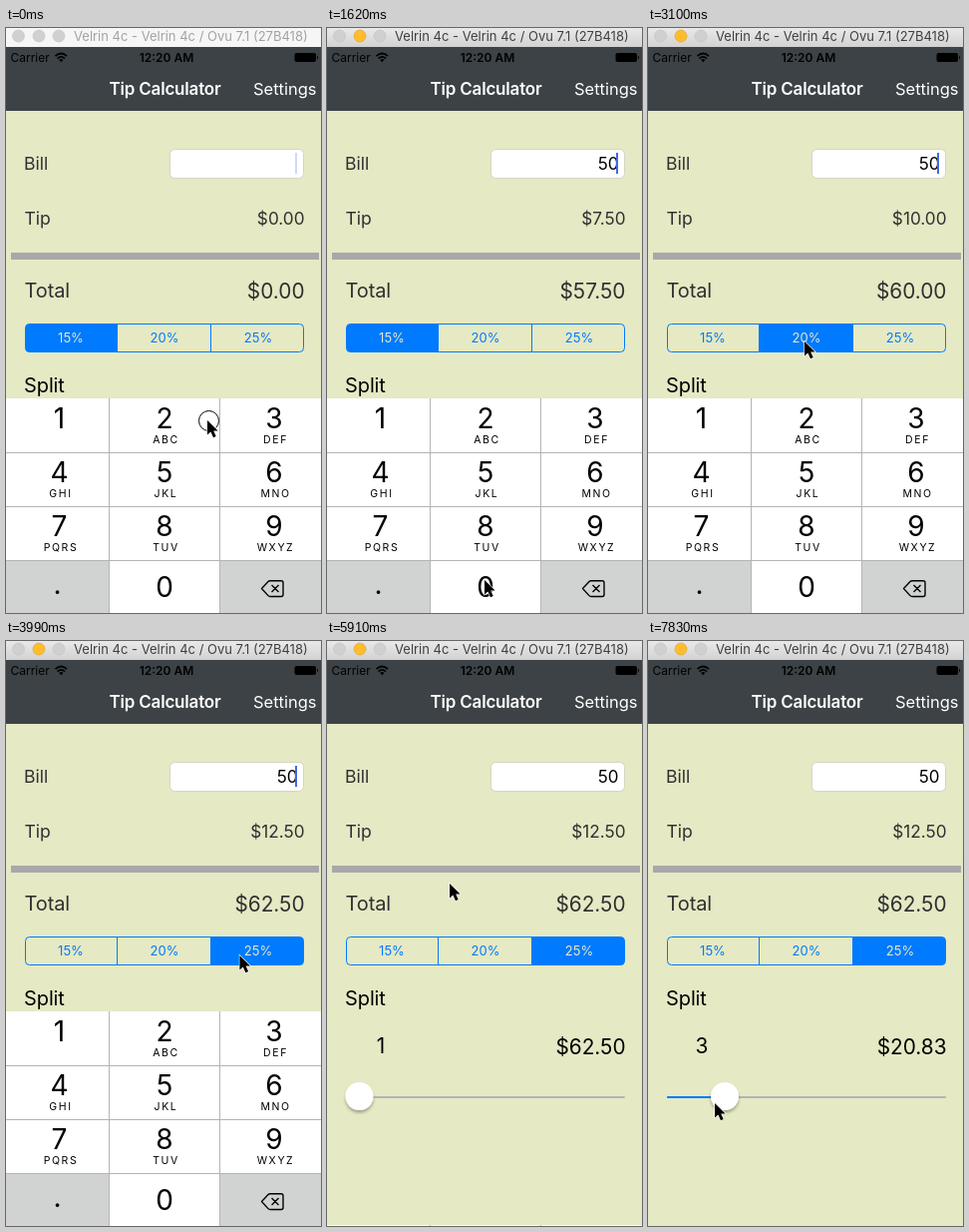
These frames come from a looping animation (316 by 586 pixels, 8000 ms). An HTML page:

```html
<!DOCTYPE html>
<html lang="en">
<head>
<meta charset="utf-8">
<title>Tip Calculator</title>
<style>
  html, body { margin: 0; width: 100%; height: 100%; overflow: hidden; background: #e5e9c4; }
  svg { display: block; width: 100%; height: 100%; font-family: Inter, Roboto, sans-serif; }
  .mid { text-anchor: middle; }
  .end { text-anchor: end; }
  .label { font-size: 17.6px; fill: #303030; }
  .amount { font-size: 17.2px; fill: #303030; }
  .big { font-size: 20px; letter-spacing: -.1px; }
  .bigAmount { font-size: 20.8px; }
  .digit { font-size: 28px; text-anchor: middle; }
  .letters { font-size: 10.5px; letter-spacing: 1.6px; text-anchor: middle; }
  .line { fill: none; stroke: #000; }
</style>
</head>
<body>
<svg viewBox="0 0 316 586" preserveAspectRatio="none">
  <defs>
    <linearGradient id="chrome" x2="0" y2="1">
      <stop stop-color="#e9e9e9"/><stop offset="1" stop-color="#d2d2d2"/>
    </linearGradient>
    <filter id="shadow" x="-40%" y="-40%" width="180%" height="190%">
      <feDropShadow dx="0" dy="2.5" stdDeviation="1.8" flood-opacity=".3"/>
    </filter>
  </defs>
  <rect width="316" height="586" fill="#e5e9c4"/>

  <rect id="titleBar" width="316" height="19"/>
  <circle cx="12.5" cy="8" r="6" fill="#d0d0d0" stroke="#c2c2c2" stroke-width=".6"/>
  <circle id="minimise" cx="33" cy="8" r="6" stroke-width=".6"/>
  <circle cx="53" cy="8" r="6" fill="#d0d0d0" stroke="#c2c2c2" stroke-width=".6"/>
  <text id="windowTitle" x="68" y="13" font-size="13">Velrin 4c - Velrin 4c / Ovu 7.1 (27B418)</text>

  <rect y="19" width="316" height="64" fill="#3c4245"/>
  <text x="4.5" y="34" font-size="12">Carrier</text>
  <g class="line" stroke-width="1.7">
    <path d="M49.5 28.2Q55.3 22.8 61 28.2M51.6 30.6Q55.3 27.2 59 30.6"/>
    <path d="M53.2 32Q55.3 30.2 57.4 32L55.3 34.2Z" fill="#000" stroke="none"/>
  </g>
  <text class="mid" x="161" y="34" font-size="12" font-weight="600">12:20 AM</text>
  <rect x="289.5" y="25" width="21.5" height="9" rx="2"/>
  <path d="M312 27.5q2 2 0 4z"/>
  <g fill="#fff">
    <text class="mid" x="159.5" y="67" font-size="17" font-weight="600" letter-spacing="-.2">Tip Calculator</text>
    <text class="end" x="311.5" y="67" font-size="16.5">Settings</text>
  </g>

  <text class="label" x="18" y="142">Bill</text>
  <rect x="164.5" y="121.5" width="134" height="29" rx="5" fill="#fff" stroke="#d3d6c4"/>
  <text id="bill" class="end" x="292.5" y="141.5" font-size="17"></text>
  <rect id="caret" x="290" y="125" width="2" height="21" fill="#4169e8"/>
  <text class="label" x="18.5" y="197">Tip</text>
  <text id="tip" class="amount end" x="299.5" y="197"></text>
  <rect x="5" y="225" width="309" height="7" fill="#a9a8a9"/>
  <text class="big" x="18.5" y="270" fill="#303030">Total</text>
  <text id="total" class="bigAmount end" x="299.5" y="270.5" fill="#303030"></text>
  <g id="segments"></g>

  <text class="big" x="18" y="365">Split</text>
  <text id="people" class="bigAmount mid" x="54" y="413"></text>
  <text id="share" class="bigAmount end" x="299.5" y="413.5"></text>
  <rect x="19" y="456" width="280" height="2" rx="1" fill="#b4b5b2"/>
  <rect id="filled" x="19" y="456" height="2" rx="1" fill="#007aff"/>
  <circle id="thumb" cy="456" r="14" fill="#fff" filter="url(#shadow)"/>

  <g id="keyboard"></g>
  <circle id="ring" class="line" cx="203.5" cy="393.5" r="10"/>
  <path id="pointer" d="M0 0V14.5L3.4 11.4L6 17.2L8.7 16L6.2 10.4H10.6Z" stroke="#fff" stroke-width="1.2" paint-order="stroke"/>
</svg>
<script>
const $ = id => document.getElementById(id);
const set = (id, attrs) => Object.entries(attrs).forEach(([k, v]) => $(id).setAttribute(k, v));
const clamp = (v, lo = 0, hi = 1) => Math.min(hi, Math.max(lo, v));
const money = v => '$' + v.toFixed(2);

const LOOP = 8000, TICK = 147.7, LAST_TICK = 53;
const RATES = [15, 20, 25], EDGES = [19.5, 111.5, 205.5, 298.5];
const GREY = '#d1d3d3';

// Segmented control
$('segments').innerHTML = RATES.map((rate, i) => {
  const [a, b] = [EDGES[i], EDGES[i + 1]], w = b - a;
  const shape = i === 0 ? `M${b} 296.5H${a + 4}q-4 0-4 4v20q0 4 4 4H${b}Z`
    : i === 2 ? `M${a} 296.5H${b - 4}q4 0 4 4v20q0 4-4 4H${a}Z`
    : `M${a} 296.5h${w}v28h${-w}Z`;
  return `<path id="seg${i}" d="${shape}" stroke="#007aff"/>
    <text id="rate${i}" class="mid" x="${65 + 94 * i}" y="315" font-size="13">${rate}%</text>`;
}).join('');

// Number pad
const COLUMNS = [[0, 103, 53.5], [104, 110, 159], [215, 101, 269]];
const KEYS = ['1', '2 ABC', '3 DEF', '4 GHI', '5 JKL', '6 MNO', '7 PQRS', '8 TUV', '9 WXYZ', '.', '0', ''];
$('keyboard').innerHTML = '<rect y="371" width="316" height="216" fill="#b3b5b5"/>' + KEYS.map((key, i) => {
  const [digit, letters = ''] = key.split(' ');
  const [x, w, cx] = COLUMNS[i % 3], y = 371 + 54 * Math.floor(i / 3);
  const bottom = i > 8, fill = bottom && digit !== '0' ? GREY : '#fff';
  return `<rect id="key${i}" x="${x}" y="${y + (i > 2)}" width="${w}" height="${i > 2 ? 53 : 54}" fill="${fill}"/>
    <text class="digit" x="${digit === '.' ? 51.5 : cx}" y="${y + (digit === '.' ? 34 : bottom ? 37 : 30)}">${digit}</text>
    <text class="letters" x="${cx + 1.5}" y="${y + 45}">${letters}</text>`;
}).join('') + `<path class="line" stroke-width="1.4" stroke-linejoin="round"
  d="M256.5 561.5L263 554.5Q263.8 553.7 265 553.7H276Q278 553.7 278 555.7V567.5Q278 569.5 276 569.5H265Q263.8 569.5 263 568.6ZM266.5 558l7 7m0-7l-7 7"/>`;

// Pointer stops: tick, x, y
const PATH = [
  [0, 202, 393], [3, 163, 441], [6, 160, 450], [7, 160, 507], [8, 158, 543], [9, 158, 553], [12, 158, 553],
  [15, 155, 348], [16, 154.5, 343], [18, 157, 314], [24, 157, 314], [26, 234, 315], [29, 235.5, 315],
  [33, 126, 215], [34, 124.5, 211.5], [37, 123, 243], [40, 123, 243], [44, 25, 461], [45, 22.5, 463],
  [46, 22.5, 463], [48, 34, 463], [52, 63, 463], [53, 67, 463]
];
function pointerAt(tick) {
  const i = Math.max(1, PATH.findIndex(p => p[0] >= tick));
  const [a, b] = [PATH[i - 1], PATH[i]];
  const k = clamp((tick - a[0]) / (b[0] - a[0])), ease = k * k * (3 - 2 * k);
  return [a[1] + (b[1] - a[1]) * ease, a[2] + (b[2] - a[2]) * ease];
}

// Critically damped spring sliding the keyboard away
function keyboardShift(tick) {
  const x = 2.703 * Math.max(0, tick - 37.25);
  return Math.round(215 * (1 - (1 + x) * Math.exp(-x)));
}

function caretOpacity(tick) {
  if (tick >= 38) return 0;
  if (tick >= 11 && tick < 14) return 1;
  const phase = (tick * TICK + (tick < 6 ? -270 : 50)) / 1000;
  return clamp(.5 + 2 * Math.cos(2 * Math.PI * phase));
}

function draw(tick) {
  const active = tick >= 4;
  set('titleBar', { fill: active ? 'url(#chrome)' : '#f6f6f6' });
  set('windowTitle', { fill: active ? '#404040' : '#a3a3a3' });
  set('minimise', { fill: active ? '#fdbd2e' : '#d0d0d0', stroke: active ? '#dfa023' : '#c2c2c2' });

  const bill = tick < 6 ? 0 : tick < 11 ? 5 : 50;
  const choice = tick < 19 ? 0 : tick < 27 ? 1 : 2;
  const tip = bill * RATES[choice] / 100, total = bill + tip;
  $('bill').textContent = bill || '';
  $('tip').textContent = money(tip);
  $('total').textContent = money(total);
  set('caret', { opacity: caretOpacity(tick) });
  RATES.forEach((_, i) => {
    set('seg' + i, { fill: i === choice ? '#007aff' : 'none' });
    set('rate' + i, { fill: i === choice ? '#e5e9c4' : '#007aff' });
  });

  const [x, y] = pointerAt(tick);
  const thumb = tick < 45 ? 32.5 : x + 10;
  const people = Math.round(1 + (thumb - 32.5) / 28);
  $('people').textContent = people;
  $('share').textContent = money(total / people);
  set('thumb', { cx: thumb });
  set('filled', { width: thumb - 19 });

  set('key4', { fill: tick === 5 ? GREY : '#fff' });
  set('key10', { fill: tick === 10 ? GREY : '#fff' });
  set('keyboard', { transform: `translate(0 ${keyboardShift(tick)})` });
  set('ring', { opacity: tick === 0 ? 1 : 0 });
  set('pointer', { transform: `translate(${x} ${y})` });
}

const start = performance.now();
function frame() {
  const ms = (performance.now() - start) % LOOP;
  draw(Math.min(LAST_TICK, Math.floor((ms + 8) / TICK)));
  requestAnimationFrame(frame);
}
frame();
</script>
</body>
</html>
```
